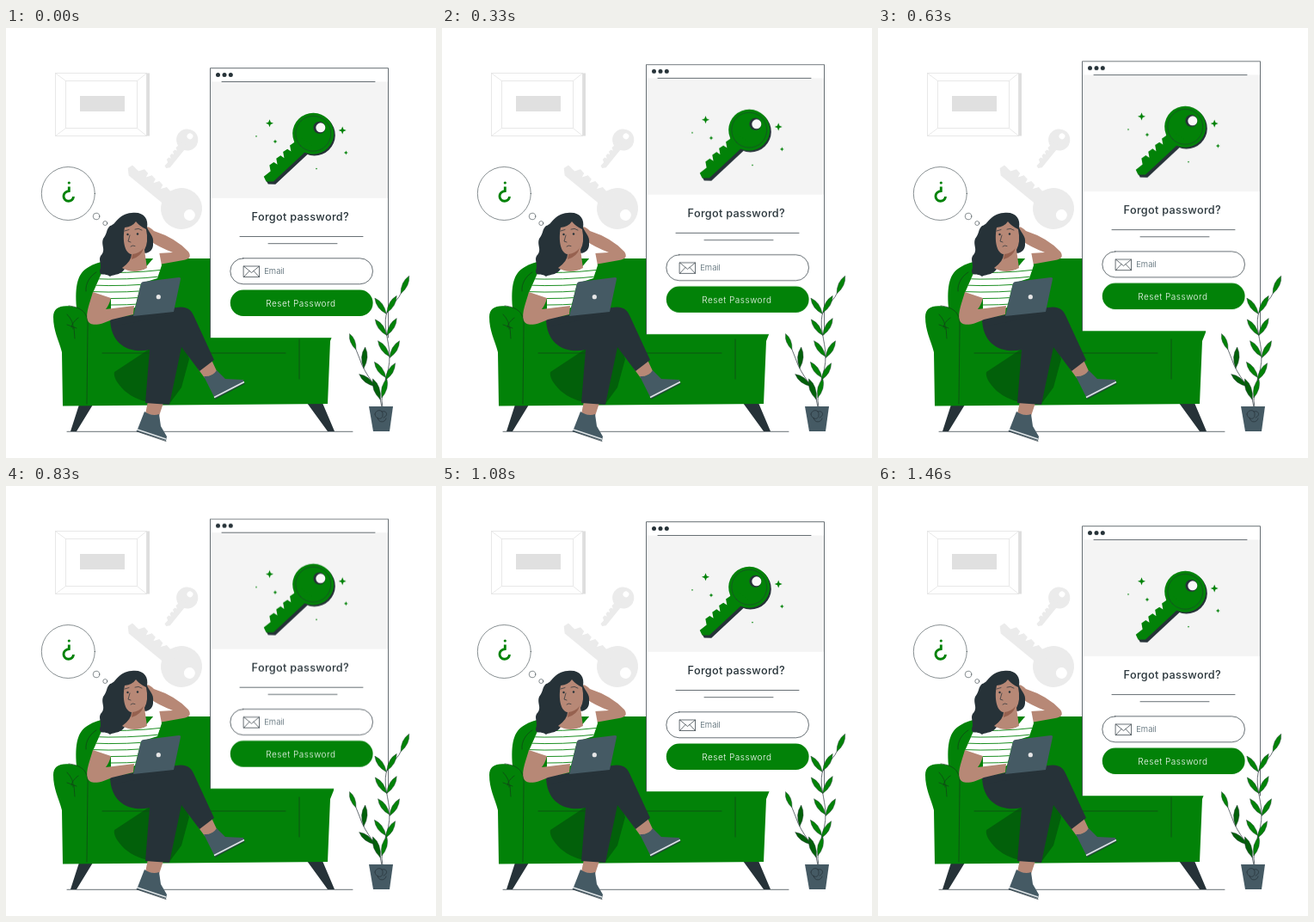
Write an HTML page that moves like this. It is 500 by 500 pixels and loops after 1500 ms.

```html
<!DOCTYPE html>
<html lang="en">
<head>
<meta charset="utf-8">
<title>Forgot password</title>
<style>
  html, body { margin: 0; width: 100%; height: 100%; overflow: hidden; background: #fff; }
  svg { display: block; width: 100vw; height: 100vh; }
  text { font-family: Inter, "Open Sans", sans-serif; text-anchor: middle; }
  .green { fill: #028208; }
  .dark { fill: #263238; }
  .slate { fill: #455a64; }
  .skin { fill: #b78876; }
  .pale { fill: #ebebeb; }
  .shade { fill: #02600a; }
  .white { fill: #fff; }
  .line { fill: none; stroke: #263238; stroke-width: .7; stroke-linecap: round; stroke-linejoin: round; }
  .faint { fill: none; stroke: #e3e3e3; stroke-width: .8; }
</style>
</head>
<body>
<svg viewBox="0 0 500 500">
  <defs>
    <path id="shaft"/>
    <g id="key">
      <circle r="24"/>
      <use href="#shaft"/>
    </g>
    <path id="top" d="M112 283 L134 274 L160 281 L178 260 L181 276 L176 291 L157 297 L150 325 L122 334 L122 315 L101 308Z"/>
    <clipPath id="shirt"><use href="#top"/></clipPath>
  </defs>

  <!-- wall picture -->
  <rect x="163" y="52.5" width="4" height="73" fill="#dedede"/>
  <g class="faint">
    <rect x="57.5" y="52.5" width="106" height="73"/>
    <rect x="69.5" y="61.5" width="83" height="55"/>
    <path d="M57.5 52.5 l12 9 M163.5 52.5 l-11 9 M57.5 125.5 l12 -9 M163.5 125.5 l-11 -9"/>
  </g>
  <rect x="86" y="79" width="52" height="18" fill="#e0e0e0"/>

  <!-- wall keys -->
  <g class="pale" transform="translate(210.7 130) rotate(128) scale(.525)">
    <use href="#key"/>
    <circle class="white" cx="-10" r="6.5"/>
  </g>
  <g class="pale" transform="translate(204 210) rotate(218.500)">
    <use href="#key"/>
    <circle class="white" cx="-12" r="6.5"/>
  </g>

  <!-- thought bubble -->
  <g class="line" style="stroke-width:.55">
    <circle cx="72.3" cy="192.5" r="31"/>
    <circle cx="105" cy="219" r="3.8"/>
    <circle cx="115.3" cy="227" r="2.5"/>
  </g>
  <circle class="green" cx="73.3" cy="180" r="1.6"/>
  <path d="M73.3 184.500 V189.500 C69 190 67 193 67 195.500 A5.700 5.500 0 0 0 78.500 196" fill="none" stroke="#028208" stroke-width="2.900"/>

  <!-- sofa -->
  <path class="line" d="M71 469.3 H403"/>
  <path class="dark" d="M85 438 H101 L82 469 H75Z M350 436 H368 L382 469 H374Z"/>
  <path class="green" d="M82 325 C80 300 83 285 96 278 C107 271 126 268 150 268 H325 C350 268 356 285 357 320 C376 324 384 338 381 354 L377 364 L374 437 L66 439.500 L65 377 C61 362 55 352 55 336 C55 324 66 321 82 325Z"/>
  <path class="shade" d="M167 373 L126 400 Q124 408 138 422 Q150 432 165 435Z M205 360 L213 385 L204 418 L190 437Z"/>
  <g class="line" style="stroke:#124018">
    <path d="M73 323 C90 325 96 333 95 348 L94 437 M71 333 Q79 341 78 350 M84 337 Q77 342 76 348 M71 345 L82 349 M79 348 L80 361 M112 378 H172 M224 378 H325 M341 362 V408 M93 306 C92 297 98 288 105 284"/>
  </g>

  <!-- legs and shoes -->
  <path class="skin" d="M165 434 L183 436 L178 451 L162 449Z M223 396 L239 386 L246 401 L231 407Z"/>
  <path class="dark" d="M121 337 L151 334 L198 325 C209 323 215 327 218 334 L242 386 L225 399 L204 371 L190 438 L162 436 L167 374 C146 379 121 370 121 337Z"/>
  <g class="slate">
    <path d="M161 446 Q170 452 178 449 L180 463 L187 475 L186 480 L152 469Z"/>
    <path d="M230 405 Q240 406 245 398 L255 408 L276 409 L277 413 L243 431Z"/>
  </g>
  <path d="M153 467 L186 478 M242 429.500 L277 411.500" stroke="#dfe4e6" stroke-width="1.500"/>
  <path class="line" d="M152 469 L186 480.500 M243 431.500 L277.500 413.500"/>

  <!-- woman -->
  <path class="skin" d="M160 237 C160 228 168 231 172 236 Q197 244 212 260 C216 266 213 269 206 270 L178 275 L177 262 L194 261 Q176 254 167 247Z"/>
  <use href="#top" class="white"/>
  <g id="stripes" clip-path="url(#shirt)" fill="none" stroke="#028208" stroke-width=".9"></g>
  <path class="dark" d="M146 215 C160 213 166 222 164 232 C167 239 172 242 171 250 C172 259 164 264 157 261 L139 278 C135 288 125 286 121 289 C115 284 109 290 109 282 C112 275 107 270 110 265 C117 258 110 253 113 245 C118 239 116 235 121 230 C128 229 130 216 146 215Z"/>
  <path class="skin" d="M138 232 Q147 231 151 225 Q156 231 163 234 Q166 249 161 258 L164 279 Q149 287 135 279 Q146 271 146 263 C138 262 135 247 138 232Z"/>
  <path d="M147 263 Q155 262 160 256 Q157 266 146 269Z" fill="#96614f"/>
  <path class="line" d="M138 236 L143 234.500 M150 234 Q154 232 158 235 M144 241 L142 248 L145 249 M145 254 Q147 252 150 253.500"/>
  <circle class="dark" cx="141.500" cy="240" r="1.200"/>
  <circle class="dark" cx="153" cy="239.500" r="1.200"/>

  <!-- laptop and near arm -->
  <path class="dark" d="M122 339 L150 333 L196 329 L190 334 L124 347Z"/>
  <path class="skin" d="M101 307 L122 314 Q120 322 116 327 L149 323 L148 333 L123 339 C111 345 98 348 95 340 C92 332 98 318 101 307Z"/>
  <path class="slate" d="M157 297 Q158 295 160 295 L201 290 Q203.500 290 203 292 L195 330 L148 335Z"/>
  <circle cx="177.300" cy="312.700" r="2.600" fill="#e6e6e6"/>

  <!-- browser window -->
  <g id="win">
    <rect class="white" x="237.500" y="46.700" width="207" height="313.500"/>
    <rect x="238" y="62.500" width="206" height="135.300" fill="#f4f4f4"/>
    <path class="line" d="M237.500 360 V46.700 H444.500 V360"/>
    <path class="line" d="M251 62.500 H429 M272 242.500 H415 M305 250.700 H385"/>
    <g class="dark">
      <circle cx="246.500" cy="54.600" r="2.500"/>
      <circle cx="254" cy="54.600" r="2.500"/>
      <circle cx="261.300" cy="54.600" r="2.500"/>
    </g>

    <use href="#key" class="dark" transform="translate(358.800 124.500) rotate(136)"/>
    <use href="#shaft" class="dark" transform="translate(359.500 126) rotate(136)"/>
    <g class="green" transform="translate(357.200 122.800) rotate(136)">
      <use href="#key"/>
      <circle class="line" r="20.500" opacity=".65"/>
      <circle class="dark" cx="-10" r="7"/>
      <circle cx="-11" cy="-1" r="5.500" fill="#f8f8f8"/>
    </g>
    <g id="stars" class="green"></g>

    <g class="line">
      <rect x="260.800" y="267.800" width="165.700" height="30" rx="15"/>
      <path d="M276.500 277 h18 v12.500 h-18z l9 7.500 l9 -7.500 M276.500 289.500 l6.500 -7 M294.500 289.500 l-6.500 -7"/>
    </g>
    <rect class="green" x="260.800" y="304.500" width="165.800" height="30.500" rx="15.200"/>
    <text x="342.300" y="224.200" font-size="12.700" font-weight="500" letter-spacing=".3" class="dark">Forgot password?</text>
    <text x="312" y="286.200" font-size="9.500" font-weight="300" fill="#455a64">Email</text>
    <text x="342.900" y="323.700" font-size="10" font-weight="300" letter-spacing=".5" fill="#fff">Reset Password</text>
  </g>

  <!-- plant -->
  <g class="line">
    <path id="stemL" d="M437 441 C434 415 418 407 411 384 L407 374"/>
    <path id="stemR" d="M438 441 C433 420 447 404 446 380 C445 362 439 349 442 334 C445 321 454 320 459 309"/>
  </g>
  <g id="leaves" stroke="#263238" stroke-width=".4"></g>
  <path class="slate" d="M422 440 H450 L446 469 H427Z"/>
  <path class="line" d="M429 449 C430 443 439 443 438 450 C438 456 430 456 429 449 M437 446 C443 444 445 451 439 453 M432 453 C433 460 441 459 442 454"/>
</svg>
<script>
  const $ = id => document.getElementById(id);

  function add(parent, d, cls = "") {
    const path = document.createElementNS("http://www.w3.org/2000/svg", "path");
    path.setAttribute("d", d);
    path.setAttribute("class", cls);
    $(parent).append(path);
  }

  // Key shaft along +x, with a toothed lower edge
  let teeth = "";
  for (let x = 66; x > 24; x -= 11) teeth += `L${x} 3 L${x - 4} 9 L${x - 10} 8`;
  $("shaft").setAttribute("d", `M10 -9 L72 -8 L78 -2 L76 4 ${teeth} L15 12Z`);

  for (let y = 283; y < 332; y += 7.5) add("stripes", `M98 ${y + 1} Q140 ${y + 3} 184 ${y - 2}`);

  function star(x, y, r) {
    const q = r * .28, p = r - q;
    add("stars", `M${x} ${y - r} l${q} ${p} ${p} ${q} ${-p} ${q} ${-q} ${p} ${-q} ${-p} ${-p} ${-q} ${p} ${-q}Z`);
  }
  // Pairs of large, medium and tiny sparkles
  [[306.5, 110.7], [391.2, 119], [313, 132], [395.3, 145], [291, 126], [361, 163.7]]
    .forEach(([x, y], i) => star(x, y, [4.5, 2.5, 1.3][i >> 1]));

  function leaf(stem, part, deg, cls = "green", len = 23) {
    const path = $(stem), { x, y } = path.getPointAtLength(part * path.getTotalLength());
    const a = deg * Math.PI / 180, dx = len * Math.cos(a), dy = len * Math.sin(a);
    const side = k => `${x + dx * .55 - dy * k} ${y + dy * .55 + dx * k}`;
    add("leaves", `M${x} ${y} Q${side(.26)} ${x + dx} ${y + dy} Q${side(-.26)} ${x} ${y}Z`, cls);
  }
  for (let i = 0; i < 4; i++) {
    leaf("stemR", .25 + i * .18, -126);
    leaf("stemR", .23 + i * .19, -60);
  }
  leaf("stemR", 1, -65);
  leaf("stemR", .08, -75);
  leaf("stemL", .12, -110, "shade", 26);
  leaf("stemL", .35, -142, "shade");
  leaf("stemL", .68, -86, "shade", 25);
  leaf("stemL", 1, -112, "green", 20);

  // Steady rise and fall with a short rest
  const bob = [[0, 0], [750, -9.4], [1460, 0], [1500, 0]];
  $("win").animate(
    bob.map(([t, y]) => ({ offset: t / 1500, transform: `translateY(${y}px)` })),
    { duration: 1500, iterations: Infinity }
  );
</script>
</body>
</html>
```
